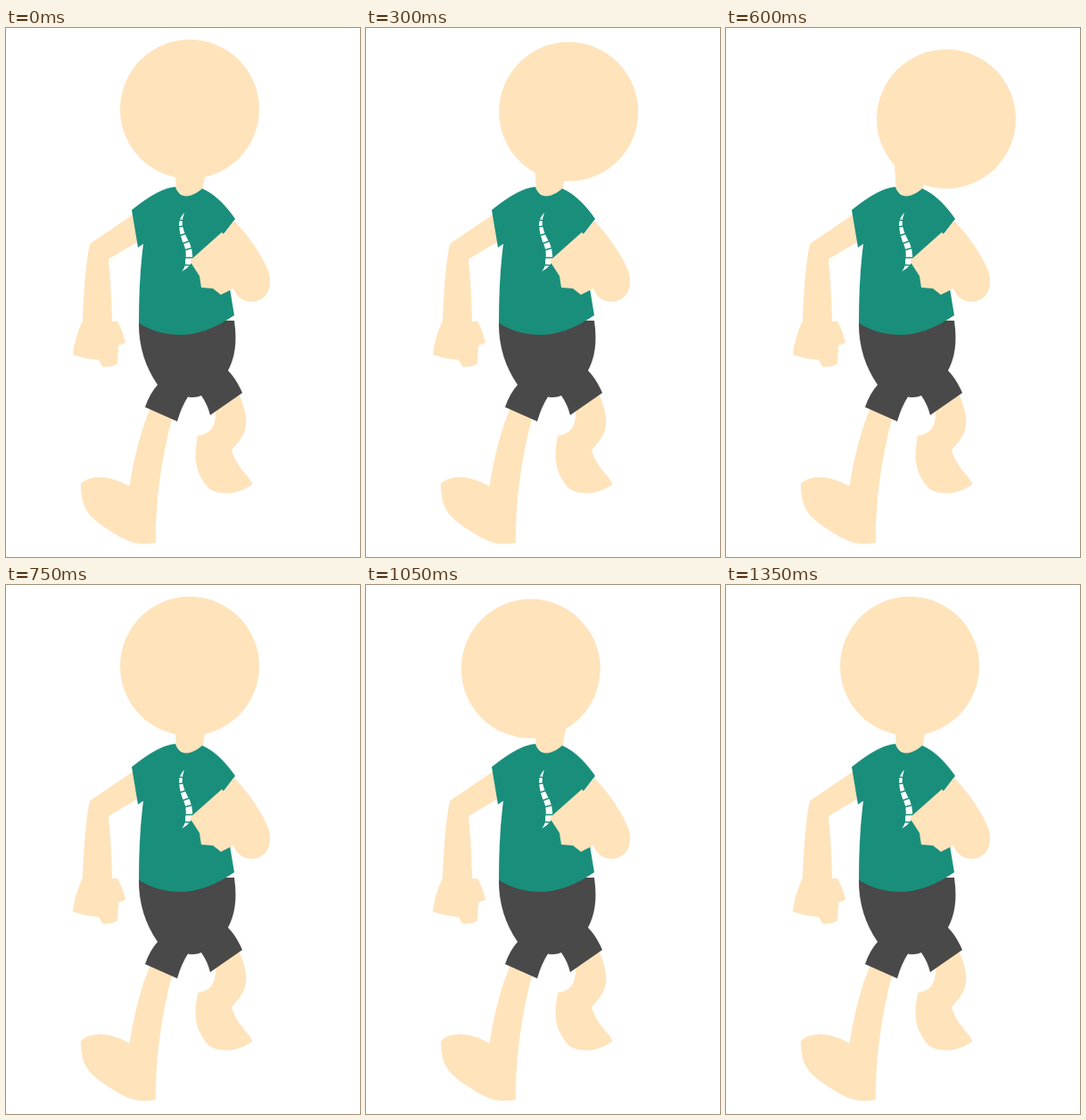
Animation of 397x593 px, one loop 1500 ms. Source, as an HTML page:

```html
<!DOCTYPE html>
<html lang="en">
<head>
<meta charset="utf-8">
<title>Head tilt</title>
<style>
  html, body { margin: 0; width: 100%; height: 100%; overflow: hidden; background: #fff; }
  svg { display: block; width: 397px; height: 593px; }
  .skin { fill: #fee3bb; }
  .shirt { fill: #198f7b; }
  .shorts { fill: #494949; }
  .gaps { fill: none; stroke: #198f7b; stroke-width: 1.5; }
</style>
</head>
<body>
<svg viewBox="0 0 397 593">
  <g class="skin">
    <circle id="head" r="78"/>
    <path d="M188 140H228L220 183L206 192L191 183Z"/>
    <!-- left arm -->
    <path d="M144 208L94 242Q88 270 86 328Q77 347 75 366Q88 371 104 372L108 379.500Q118 381 125 376L126 356L134 353Q131 339 125 329H119Q118 290 115 259L154 236Z"/>
    <!-- legs -->
    <path d="M162 426Q147 460 138.500 514C118 501 95 500 84 511C84 533 89 543 104 555C135 577 148 581 168 577Q167 510 187 434Z"/>
    <path d="M235 428C236 446 230 455 215 457C211 480 210 495 227 516C240 524 258 524 276 512C277 505 259 495 253 473C272 454 274 440 261 410Z"/>
  </g>
  <path class="shorts" d="M149 328H256Q261 362 249 384Q258 393 265 409L229 434Q226 422 219 412Q213 415 204 413.500Q197 424 192 441L156 425Q161 410 170 400Q148 368 149 328Z"/>
  <path class="shirt" d="M141 204Q172 179 190 178C194 191 206 192 220 180Q239 188 257 214L244 231L251 292L256 322Q200 361 149 331Q149 280 154 242L148 246Z"/>
  <path fill="#fff" d="M200 207Q194 213 194 221Q195 234 200 244Q203 252 201 261Q202 267 197 273Q207 268 209 260Q210 250 206 241Q200 231 198 222Q197 215 200 207Z"/>
  <path class="gaps" d="M193 215l7 1M192 223l8 -1M194 233l9 -3M197 242l11 -4M200 249l11 -3M200 257.500h11M199 265.500l11 1"/>
  <path class="skin" d="M256 216Q282 244 294 272C300 290 293 306 276 307Q261 307 255 292L251 294L241 299L232 292L219 291L217 278L206 261L242 229L244 231Z"/>
</svg>
<script>
  const head = document.getElementById("head");
  const stepMs = 150, loopMs = 1500;
  const pivot = { x: 206, y: 173 }, reach = 82;
  const tilts = [0, 1, 2, 3, 4, 0, -1, -2, -3, 0];

  function draw(time) {
    const step = Math.floor((time % loopMs) / stepMs);
    const angle = tilts[step] * 7.5 * Math.PI / 180;
    head.setAttribute("cx", pivot.x + reach * Math.sin(angle));
    head.setAttribute("cy", pivot.y - reach * Math.cos(angle));
  }

  const start = performance.now();
  function tick() {
    draw(performance.now() - start);
    requestAnimationFrame(tick);
  }
  tick();
</script>
</body>
</html>
```
